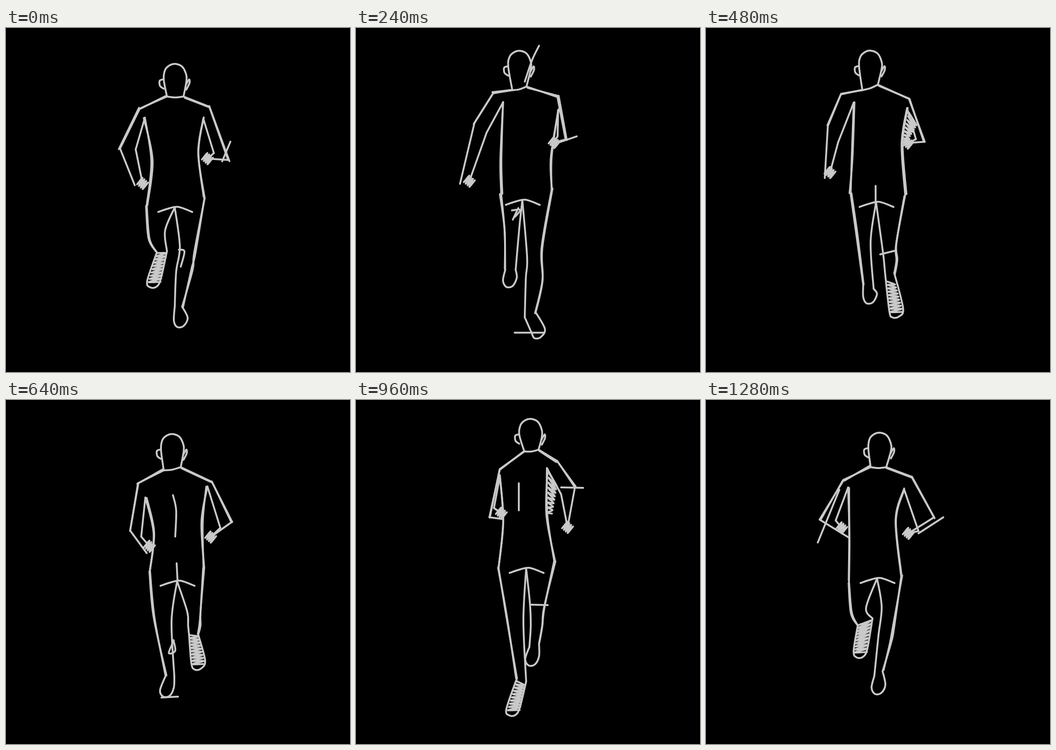
These frames come from a looping animation (748x748 px, 1360 ms). An HTML page with a canvas:

```html
<!DOCTYPE html>
<html lang="en">
<meta charset="utf-8">
<title>Runner sketch</title>
<style>
  html, body { margin: 0; height: 100%; overflow: hidden; background: #000; }
  canvas { display: block; width: 100vmin; height: 100vmin; }
</style>
<canvas width="748" height="748"></canvas>
<script>
const STEP = 80, STEPS = 17;
const keySteps = [0, 2, 5, 8, 12, 14, 16], KEYS = keySteps.length;
const wrap = i => (i + KEYS) % KEYS;
let key = 0, blend = 0, nearest = 0, seed = 1;

const spline = (a, b, c, d, u) =>
  b + u / 2 * (c - a + u * (2 * a - 5 * b + 4 * c - d + u * (3 * (b - c) + d - a)));

// A joint passes through one x, y per key pose; calling it gives its place now.
function track(...v) {
  const value = axis => spline(...[-1, 0, 1, 2].map(i => v[wrap(key + i) * 2 + axis]), blend);
  const joint = () => [value(0), value(1)];
  joint.at = i => [v[i * 2], v[i * 2 + 1]];
  return joint;
}

const head = track(368, 78, 357, 58, 357, 39, 362, 74, 380, 41, 384, 47, 378, 71);
const neckL = track(350, 149, 341, 141, 340, 127, 343, 153, 366, 112, 368, 122, 358, 146);
const neckR = track(386, 149, 372, 136, 372, 114, 380, 146, 397, 108, 409, 118, 392, 146);

const shoulderL = track(291, 175, 297, 153, 298, 128, 287, 181, 313, 150, 302, 165, 300, 173);
const elbowL = track(248, 262, 255, 224, 263, 186, 270, 284, 290, 255, 274, 262, 247, 260);
const wristL = track(280, 342, 230, 346, 238, 322, 306, 333, 320, 259, 320, 262, 312, 300);
const armpitL = track(302, 195, 314, 175, 328, 142, 303, 212, 313, 165, 306, 190, 309, 190);
const crookL = track(282, 264, 284, 235, 285, 225, 294, 297, 300, 235, 295, 245, 282, 262);
const fistL = track(297, 338, 252, 342, 252, 312, 312, 318, 316, 246, 312, 252, 295, 278);

const shoulderR = track(442, 171, 438, 156, 440, 144, 448, 178, 438, 133, 432, 128, 448, 167);
const elbowR = track(483, 287, 456, 250, 465, 237, 490, 266, 476, 190, 481, 204, 496, 255);
const armpitR = track(429, 197, 440, 185, 436, 168, 438, 188, 415, 148, 408, 150, 431, 195);
const crookR = track(452, 272, 436, 245, 450, 225, 466, 278, 446, 205, 452, 202, 462, 285);
const fistR = track(438, 284, 430, 262, 436, 232, 445, 298, 460, 277, 476, 281, 440, 290);

const waistL = track(316, 290, 314, 290, 315, 280, 321, 290, 320, 265, 322, 290, 312, 300);
const waistR = track(418, 272, 425, 290, 425, 250, 425, 265, 416, 250, 424, 268, 413, 262);
const hipL = track(306, 385, 315, 365, 315, 358, 313, 370, 310, 365, 304, 373, 311, 395);
const hipR = track(432, 370, 423, 350, 433, 360, 431, 365, 431, 350, 428, 370, 425, 380);
const crotch = track(367, 390, 360, 378, 368, 372, 372, 394, 370, 366, 370, 382, 372, 388);

const kneeOutL = track(312, 458, 320, 445, 328, 440, 323, 474, 326, 465, 316, 475, 317, 462);
const kneeInL = track(346, 440, 354, 425, 357, 455, 360, 480, 364, 480, 358, 450, 348, 452);
const ankleOutL = track(328, 488, 320, 520, 338, 540, 347, 600, 350, 605, 348, 530, 330, 490);
const ankleInL = track(350, 485, 342, 515, 362, 550, 366, 600, 370, 612, 380, 515, 362, 475);
const toeL = track(322, 564, 325, 560, 356, 579, 350, 645, 342, 686, 353, 608, 336, 560);

const kneeOutR = track(409, 490, 403, 480, 408, 475, 423, 460, 410, 450, 407, 455, 409, 495);
const kneeInR = track(378, 475, 372, 505, 376, 475, 394, 460, 378, 440, 376, 462, 382, 450);
const calfOutR = track(406, 525, 405, 560, 409, 515, 423, 490, 405, 490, 409, 505, 403, 526);
const calfInR = track(370, 530, 366, 555, 380, 510, 396, 490, 380, 490, 378, 500, 375, 512);
const ankleOutR = track(383, 606, 386, 640, 403, 553, 418, 510, 398, 530, 394, 555, 384, 590);
const ankleInR = track(367, 605, 362, 655, 382, 550, 398, 510, 377, 537, 372, 575, 366, 600);
const toeR = track(380, 650, 390, 678, 408, 650, 418, 586, 383, 577, 378, 595, 375, 639);

// Loose lines that belong to single poses.
const marks = keySteps.map(() => []);
const mark = (pose, ...v) =>
  marks[pose].push(v.flatMap((x, i) => i % 2 ? [] : [[x, v[i + 1]]]));
mark(0, 376, 482, 388, 486, 380, 519);
mark(0, 488, 247, 470, 290);
mark(1, 399, 47, 384, 78, 368, 125);
mark(1, 340, 405, 358, 404, 345, 420, 354, 400, 342, 425);
mark(1, 428, 262, 481, 244);
mark(1, 346, 671, 410, 671);
mark(2, 378, 482, 410, 474);
mark(2, 368, 333, 368, 380);
mark(3, 363, 207, 370, 240, 368, 297);
mark(3, 371, 355, 373, 393);
mark(3, 365, 523, 354, 550, 368, 545, 364, 522);
mark(3, 338, 647, 374, 645);
mark(4, 354, 181, 354, 240);
mark(4, 446, 190, 494, 191);
mark(4, 380, 445, 417, 446);
mark(5, 348, 182, 358, 240, 363, 287);
mark(5, 298, 372, 350, 378, 466, 366);
mark(5, 463, 326, 428, 375, 412, 420);
mark(5, 365, 468, 395, 452, 435, 450, 425, 468, 395, 455);
mark(6, 516, 255, 462, 290);
mark(6, 290, 195, 243, 310);

const ctx = document.querySelector('canvas').getContext('2d');
ctx.strokeStyle = '#c9c9c9';
ctx.lineCap = ctx.lineJoin = 'round';

const random = () => (seed = seed * 16807 % 2147483647) / 2147483647;
const by = ([x, y], dx, dy) => [x + dx, y + dy];
const mix = ([ax, ay], [bx, by], u) => [ax + (bx - ax) * u, ay + (by - ay) * u];

function stroke(...points) {
  const at = i => points[Math.max(0, Math.min(points.length - 1, i))];
  ctx.lineWidth = 4;
  ctx.beginPath();
  ctx.moveTo(...points[0]);
  for (let i = 0; i < points.length - 1; i++) {
    const [a, b, c, d] = [at(i - 1), at(i), at(i + 1), at(i + 2)];
    ctx.bezierCurveTo(b[0] + (c[0] - a[0]) / 6, b[1] + (c[1] - a[1]) / 6,
      c[0] - (d[0] - b[0]) / 6, c[1] - (d[1] - b[1]) / 6, ...c);
  }
  ctx.stroke();
}

// A line gone over a second time, slightly off.
function sketch(...points) {
  stroke(...points);
  stroke(...points.map(p => by(p, random() * 6 - 3, random() * 6 - 3)));
}

function hatch(a, b, c, d, count) {
  stroke(...Array.from({ length: count }, (_, i) =>
    i % 2 ? mix(c, d, i / (count - 1)) : mix(a, b, i / (count - 1))));
}

function drawHead() {
  const h = head(), part = (...v) => v.map(([x, y]) => by(h, x, y));
  stroke(neckL(), ...part([-25, 34], [-22, 13], [-12, 3], [0, 0], [15, 6], [24, 24], [24, 40]), neckR());
  stroke(...part([-25, 54], [-33, 48], [-34, 37], [-28, 34]));
  stroke(...part([23, 46], [30, 34], [31, 42], [24, 56]));
}

function drawArm(shoulder, elbow, end, armpit, crook, fist) {
  sketch(shoulder(), elbow());
  stroke(elbow(), end());
  stroke(armpit(), crook());
  stroke(crook(), fist());
  const f = fist();
  hatch(by(f, -12, 2), by(f, 2, 14), by(f, -2, -14), by(f, 12, -2), 8);
}

function drawFoot(ankleOut, ankleIn, toe, filled) {
  const a = ankleOut(), b = ankleIn(), t = toe();
  const [left, right] = a[0] < b[0] ? [a, b] : [b, a];
  const start = Math.max(0, 1 - 75 / Math.hypot(t[0] - a[0], t[1] - a[1]));
  stroke(left, by(t, -15, -14), by(t, -8, 0), by(t, 6, -2), by(t, 15, -20), right);
  if (filled) hatch(mix(left, t, start), by(t, -13, -8), mix(right, t, start), by(t, 14, -12), 20);
}

function draw(step) {
  key = keySteps.findLastIndex(s => s <= step);
  const span = (keySteps[wrap(key + 1)] - keySteps[key] + STEPS) % STEPS;
  blend = (step - keySteps[key]) / span;
  nearest = blend > .5 ? wrap(key + 1) : key;
  seed = 991 * (step + 1);
  ctx.clearRect(0, 0, 748, 748);

  drawHead();
  sketch(neckL(), shoulderL());
  stroke(neckL(), by(mix(neckL(), neckR(), .5), 0, 2), neckR());
  sketch(neckR(), shoulderR());
  drawArm(shoulderL, elbowL, wristL, armpitL, crookL, fistL);
  drawArm(shoulderR, elbowR, fistR, armpitR, crookR, fistR);

  sketch(armpitL(), waistL(), hipL());
  sketch(armpitR(), waistR(), hipR());
  const c = crotch();
  stroke(by(c, -36, 10), by(c, -12, 2), by(c, 8, -1), by(c, 38, 10));
  if ([2, 4, 5].includes(nearest))
    hatch(by(armpitR(), 4, 10), waistR(), by(armpitR(), 22, 35), by(waistR(), 10, -3), 18);

  sketch(hipL(), kneeOutL(), ankleOutL());
  stroke(c, kneeInL(), ankleInL());
  sketch(hipR(), kneeOutR(), calfOutR(), ankleOutR());
  stroke(c, kneeInR(), calfInR(), ankleInR());
  drawFoot(ankleOutL, ankleInL, toeL, ![1, 2, 3].includes(nearest));
  drawFoot(ankleOutR, ankleInR, toeR, [2, 3].includes(nearest));

  const [hx, hy] = head(), [kx, ky] = head.at(nearest);
  for (const line of marks[nearest]) stroke(...line.map(p => by(p, hx - kx, hy - ky)));
}

let shown = -1;
function tick() {
  const step = Math.floor(performance.now() / STEP) % STEPS;
  if (step !== shown) draw(shown = step);
  requestAnimationFrame(tick);
}
tick();
</script>
</html>
```
